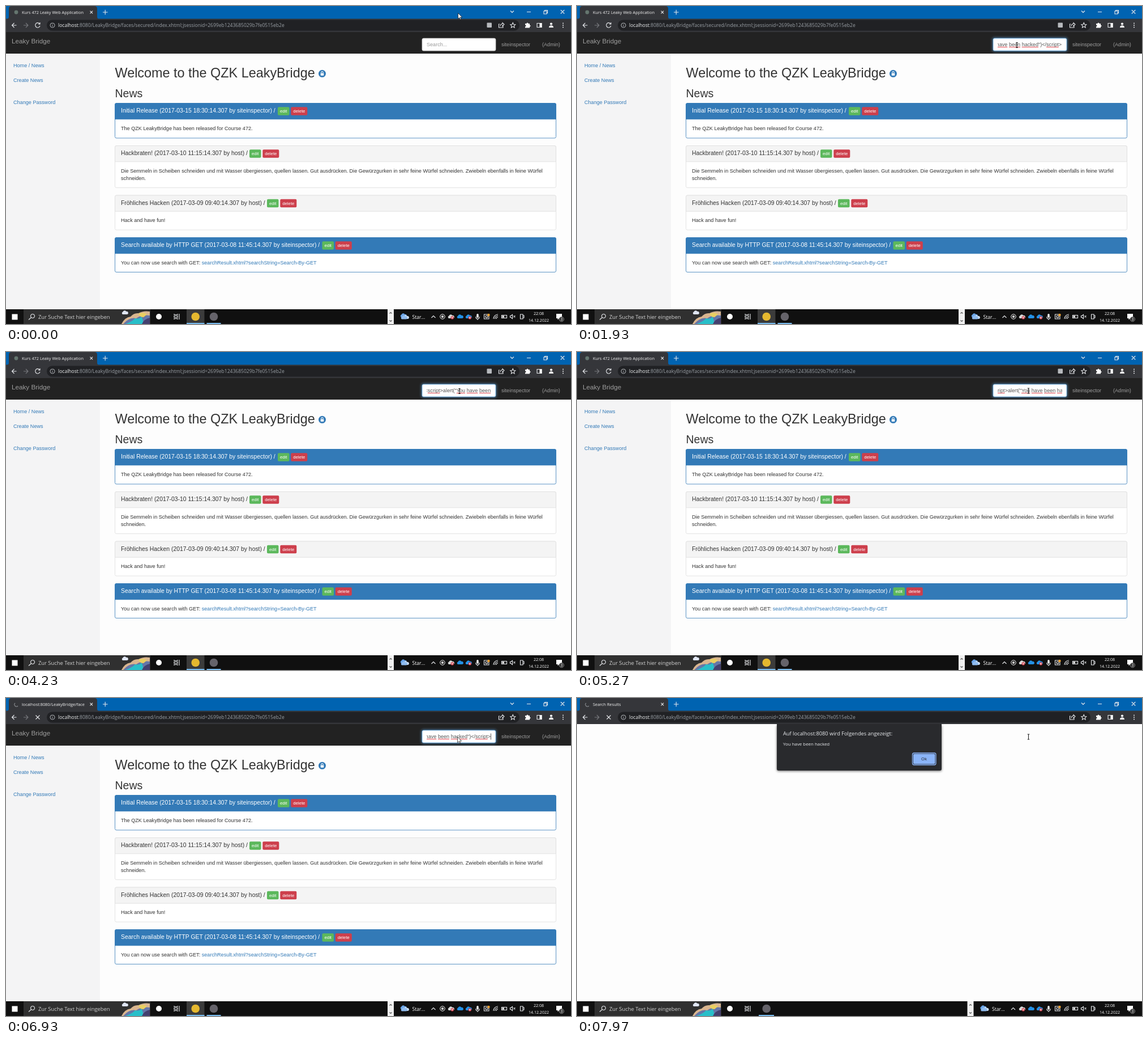
An HTML page for the animation above (8000 ms loop, 998x561 px).

```html
<!DOCTYPE html>
<html lang="de">
<head>
<meta charset="utf-8">
<title>Search demo</title>
<style>
  html, body { margin: 0; width: 100%; height: 100%; overflow: hidden; background: #fdfdfd; }
  svg { display: block; width: 100vw; height: 100vh; font: 9.1px "Liberation Sans", Arial, sans-serif; }
  text { white-space: pre; }
  .ui { font-family: "Open Sans", "Noto Sans", sans-serif; }
  .line { fill: none; stroke: #e8eaed; stroke-width: 1.1; }
  .link { fill: #337ab7; }
  #entry { font: 9.1px/22px "Liberation Sans", Arial, sans-serif; white-space: pre; color: #555; }
  #entry u { text-decoration: underline solid #e2474f .8px; text-underline-offset: 1.2px; text-decoration-skip-ink: none; }
</style>
</head>
<body>
<svg id="stage" viewBox="0 0 998 561" preserveAspectRatio="none"></svg>
<script>
const LOOP = 8000;
const FOCUS = 830, PASTE = 1450, SUBMIT = 6490, BLANK = 7150, ALERT = 7400;
const SCROLL_END = 76.6;

const rect = (x, y, w, h, fill, extra = '') =>
  `<rect x="${x}" y="${y}" width="${w}" height="${h}" fill="${fill}" ${extra}/>`;
const dot = (x, y, r, fill, extra = '') => `<circle cx="${x}" cy="${y}" r="${r}" fill="${fill}" ${extra}/>`;
const text = (x, y, s, fill, size = 9.1, extra = '') =>
  `<text x="${x}" y="${y}" fill="${fill}" font-size="${size}" ${extra}>${s}</text>`;
const ui = (x, y, s, fill, size, extra = '') => text(x, y, s, fill, size, 'class="ui" ' + extra);
const line = (d, extra = '') => `<path class="line" d="${d}" ${extra}/>`;
const shape = (d, fill, extra = '') => `<path d="${d}" fill="${fill}" ${extra}/>`;
const group = (id, ...parts) => `<g id="${id}">${parts.join('')}</g>`;

function button(x, y, w, label, fill) {
  return rect(x, y, w, 14.5, fill, 'rx="2"') +
    text(x + w / 2, y + 10, label, '#fff', 7.8, 'text-anchor="middle"');
}

function panel(y, h, blue, title, editX, ...body) {
  const edge = blue ? '#337ab7' : '#ddd';
  return rect(192.5, y + .5, 779, h - 1, '#fff', `rx="2.5" stroke="${edge}" stroke-width=".8"`) +
    shape(`M192.5 ${y + 28.7}v-25.7q0-2.5 2.5-2.5h774q2.5 0 2.5 2.5v25.7z`, blue ? '#337ab7' : '#f4f4f4', `stroke="${edge}" stroke-width=".8"`) +
    text(203, y + 17.2, title + ' /', blue ? '#fff' : '#333', 10.4) +
    button(editX, y + 7.2, 20.5, 'edit', '#5cb85c') +
    button(editX + 23.3, y + 7.2, 29, 'delete', '#cd3f4c') +
    body.map((s, i) => text(203, y + 47.8 + 13 * i, s, '#333')).join('');
}

function cloud(x, y, fill, crossed) {
  return shape(`M${x - 4} ${y + 3}a2.5 2.5 0 0 1 .5-4.5a3.2 3.2 0 0 1 6-.5a2.6 2.6 0 0 1 1.5 5z`, fill) +
    (crossed ? dot(x + 2.3, y + 2, 2.7, '#d32f3c') +
      line(`M${x + 1.2} ${y + .9}l2.2 2.2m0-2.2l-2.2 2.2`, 'stroke-width=".7"') : '');
}

function browserChrome() {
  return rect(0, 0, 998, 23, '#0063b1') +
    shape('M1 23q4 0 4-4V5q0-5 5-5h146q5 0 5 5v14q0 4 4 4z', '#35363a') +
    group('favicon', dot(18, 11, 3.4, '#65766f')) +
    group('spinner', line('M16 9a3.5 3.5 0 0 0 5 5', 'style="stroke:#8a8d91"')) +
    '<clipPath id="tabClip"><path d="M28 0h111v22h-111z"/></clipPath>' +
    ui(28, 13.8, '', '#f1f1f1', 7.35, 'id="tabTitle" clip-path="url(#tabClip)"') +
    line('M148.500 8.700l4.600 4.600m0-4.600l-4.600 4.600M171 11h8.500M175.200 6.800v8.500') +
    line('M891 8.500l3 3 3-3M920 10.500h7M950 9h5v5h-5zM951.500 9V7.500h5v5h-1.500M979.800 7l6.500 6.500m0-6.500l-6.500 6.500', 'stroke-width=".8"') +
    rect(0, 22.5, 998, 23.5, '#35363a') + rect(72, 24.5, 835, 19, '#202124', 'rx="9.500"') +
    line('M18.500 34h-8m4-4l-4 4 4 4') +
    line('M31 34h8m-4-4l4 4-4 4', 'style="stroke:#77797d"') +
    group('reload', line('M59.500 31.500a4.200 4.200 0 1 0 .5 3.500M60 29v3h-3')) +
    group('stop', line('M52.500 30.500l7 7m0-7l-7 7')) +
    line('M82 30a4 4 0 1 0 .1 0M82 33.500v2.700M82 31.500v.9', 'style="stroke:#a3a6aa" stroke-width=".9"') +
    ui(92, 37.2, '<tspan fill="#f1f3f4">localhost</tspan>:8080/LeakyBridge/faces/secured/index.xhtml;jsessionid=2699eb1243685029b7fe0515eb2e', '#9aa0a6', 8.56) +
    group('translate', rect(849.5, 29.5, 8.5, 8.5, '#b6b9bd', 'rx="1"')) +
    line('M872 32h-1.500v6h7.500v-2.500M873 35.500q.5-4 4-4v-2l3 3-3 3v-2', 'stroke-width=".8"') +
    line('M895.300 29.500l1.300 3 3.200.3-2.400 2.100.7 3.200-2.800-1.700-2.800 1.700.7-3.200-2.400-2.100 3.200-.3z', 'stroke-width=".9"') +
    shape('M917 31h2.500a1.500 1.500 0 1 1 3 0h2.500v2.500a1.500 1.500 0 1 1 0 3v2h-8v-2.200a1.500 1.500 0 0 0 0-3z', '#fff') +
    line('M938 30.500h8v7h-8z') + rect(942.5, 30, 4, 8, '#fff') +
    dot(963, 31.5, 2.1, '#fff') + shape('M959 38q0-3.800 4-3.800t4 3.800z', '#fff') +
    [30.5, 34, 37.5].map(y => dot(984, y, 1, '#e8eaed')).join('');
}

function page() {
  return rect(0, 84, 166, 451, '#f4f4f5') + rect(0, 46, 998, 38, '#222') +
    text(10, 66.3, 'Leaky Bridge', '#9d9d9d', 11.7) +
    text(875, 70.8, 'siteinspector', '#9d9d9d') + text(947, 70.8, '(Admin)', '#9d9d9d') +
    text(13, 108, 'Home / News', '#337ab7') + text(13, 134, 'Create News', '#337ab7') +
    text(13, 173, 'Change Password', '#337ab7') +
    text(192.5, 126, 'Welcome to the QZK LeakyBridge', '#333', 23.4) +
    dot(558.5, 119.3, 6.5, '#337ab7') + rect(555.7, 118.5, 5.6, 4.2, '#fff', 'rx=".6"') +
    line('M556.800 118.500v-1.300a1.700 1.700 0 0 1 3.400 0v1.300', 'style="stroke:#fff"') +
    text(192.5, 160.5, 'News', '#333', 19.5) +
    panel(171, 62.5, true, 'Initial Release (2017-03-15 18:30:14.307 by siteinspector)', 480,
      'The QZK LeakyBridge has been released for Course 472.') +
    panel(246, 75, false, 'Hackbraten! (2017-03-10 11:15:14.307 by host)', 430,
      'Die Semmeln in Scheiben schneiden und mit Wasser übergiessen, quellen lassen. Gut ausdrücken. Die Gewürzgurken in sehr feine Würfel schneiden. Zwiebeln ebenfalls in feine Würfel',
      'schneiden.') +
    panel(333.5, 62, false, 'Fröhliches Hacken (2017-03-09 09:40:14.307 by host)', 461, 'Hack and have fun!') +
    panel(408, 62, true, 'Search available by HTTP GET (2017-03-08 11:45:14.307 by siteinspector)', 558.5,
      'You can now use search with GET: <tspan class="link">searchResult.xhtml?searchString=Search-By-GET</tspan>') +
    group('glow', rect(733.5, 55.5, 133, 25, '#66afe9', 'rx="4" opacity=".5" filter="url(#blur)"')) +
    rect(735, 57, 130, 22, '#fff', 'id="field" rx="2.500" stroke-width=".8"') +
    text(743, 70.8, 'Search...', '#999', 9.1, 'id="placeholder"') +
    '<foreignObject x="743" y="57" width="114" height="22"><div id="entry">' +
    '&lt;<u>script</u>&gt;alert("<u>You</u> <u>have</u> <u>been</u> <u>hacked</u>")&lt;/<u>script</u>&gt;</div></foreignObject>' +
    rect(743, 62.5, .8, 11, '#333', 'id="caret"');
}

function suggestions() {
  const items = ['hallo', "&lt;script alert=('asdf'); &gt;", "alert('You have been hacked')",
    'Change', 'Search', "alert('you have been hacked!')"];
  return rect(786, 84, 133, 146, '#000', 'rx="2" opacity=".4" filter="url(#blur)"') +
    rect(786, 84, 133, 146, '#222326', 'rx="2"') +
    items.map((s, i) => ui(794, 101.8 + 23.35 * i, s, '#eceef0', 7.95)).join('');
}

function dialog() {
  return rect(353, 48, 291, 81, '#000', 'rx="3" opacity=".6" filter="url(#blur)"') +
    shape('M353 46h291v79q0 3-3 3h-285q-3 0-3-3z', '#292a2d') +
    ui(364, 65.5, 'Auf localhost:8080 wird Folgendes angezeigt:', '#e8eaed', 9.28) +
    ui(364, 83.7, 'You have been hacked', '#e8eaed', 7.9) +
    rect(592.5, 97, 41.5, 21, '#292a2d', 'rx="3" stroke="#8ab4f8" stroke-width="1.300"') +
    rect(594, 98.5, 38.5, 18, '#8ab4f8', 'rx="2"') +
    ui(613, 110.3, 'Ok', '#202124', 7.6, 'text-anchor="middle"');
}

function taskbar() {
  return rect(0, 535, 998, 26, '#101010') + rect(10.5, 543.5, 10, 10, '#fff') +
    rect(31, 535, 224, 26, '#303030') +
    line('M47 543.500a3.500 3.500 0 1 0 .1 0M44.500 549.500l-4.500 4') +
    ui(57, 551.7, 'Zur Suche Text hier eingeben', '#d2d2d2', 9.4) +
    shape('M204 561q6-12 16-13 6-7 14-6 9-5 20-3v22z', '#d9b58f') +
    shape('M207 561q11-13 23-10 10-7 24-5v15z', '#6576a8') +
    shape('M211 561q13-5 17-10 8 2 11-3 4 6 3 13z', '#28bfc9') +
    shape('M234 543q9-4 15 1l-6 5q-7 0-9-6z', '#e9cf62') +
    shape('M240 561q4-9 14-11v11z', '#44406f') +
    cloud(210, 541, '#dfe5f2', false) +
    dot(270, 548, 5, '#fff') +
    line('M297 543v1.500h6V543M297 553v-1.500h6v1.500M297 546.500h6v3h-6zM306 543v10', 'stroke-width=".9"') +
    group('apps', rect(319, 535, 31.5, 26, '#3b3b3b'), rect(319, 559, 31.5, 2, '#76b9ed'),
      dot(334.7, 548, 7.3, '#e5b82f'), rect(354.5, 559, 25, 2, '#76b9ed'), dot(367, 548, 7.3, '#65636a')) +
    group('appsLate', rect(321, 559, 27, 2, '#76b9ed'), dot(334.7, 548, 7.3, '#65636a')) +
    group('record', dot(771, 548, 4.2, 'none', 'stroke="#fff"'), dot(771, 548, 2, '#fff')) +
    group('tray',
      rect(674, 535, 11, 26, '#f0f0f0'),
      line('M677.500 542.500l2-2 2 2M677.500 554.500l2 2 2-2', 'style="stroke:#555"'),
      cloud(702, 546, '#6aa5e8', false), cloud(706, 549, '#cfe0f6', false), cloud(703, 549.5, '#8fbcf0', false),
      ui(717.5, 551.8, 'Star...', '#fff', 8.6),
      line('M751.500 550l3.500-3.500 3.500 3.500')) +
    cloud(786, 548, '#d8d8d8', true) + cloud(802, 548, '#2491e6', false) + cloud(817, 548, '#2491e6', true) +
    rect(831.3, 543, 3.4, 7, '#fff', 'rx="1.700"') + line('M829.800 548q0 4 3.200 4t3.200-4M833 552v2', 'stroke-width=".8"') +
    line('M844.500 544h8.500v8h-8.500zM847 548a2 2 0 1 0 4 0a2 2 0 1 0-4 0', 'stroke-width=".9"') + dot(852.5, 545, 2.2, '#f0a030') +
    line('M861 552a8 8 0 0 1 8-8M863.500 552a5.500 5.500 0 0 1 5.500-5.500M866 552a3 3 0 0 1 3-3', 'stroke-width=".8"') +
    line('M875.500 545.500h9v5h-9z', 'stroke-width=".9"') + rect(876.5, 546.5, 3.5, 3, '#fff') +
    line('M890.500 546.500h1.500l2.500-2v7l-2.500-2h-1.500zM896.500 546.500l3 3m0-3l-3 3', 'stroke-width=".8"') +
    line('M908.500 544h4.500v8h-4.500zM913 546h2v4h-2', 'stroke-width=".9"') +
    ui(941, 544.6, '22:08', '#fff', 7.05, 'text-anchor="middle"') +
    ui(941, 556.5, '14.12.2022', '#fff', 7.05, 'text-anchor="middle"') +
    shape('M972 543h10v8h-5l-2.500 2.500V551h-2.500z', '#fff') +
    dot(981.3, 552.5, 4.2, '#333', 'stroke="#b8b8b8" stroke-width=".6"') +
    ui(981.3, 555, '3', '#fff', 6.5, 'text-anchor="middle"');
}

const stage = document.getElementById('stage');
stage.innerHTML =
  '<filter id="blur" x="-20%" y="-50%" width="140%" height="200%"><feGaussianBlur stdDeviation="2"/></filter>' +
  rect(0, 0, 998, 561, '#fdfdfd') +
  group('page', page()) + browserChrome() + group('suggestions', suggestions()) +
  group('dialog', dialog()) + taskbar() +
  group('arrow', shape('M0 0v10.200l2.400-2.200 1.600 3.600 1.500-.7-1.600-3.500h3.300z', '#fff', 'stroke="#111" stroke-width=".7"')) +
  group('beam', line('M-1.800-4.500h3.600M0-4.500v9M-1.800 4.500h3.600', 'style="stroke:#222" stroke-width=".9"'));

const el = Object.fromEntries([...stage.querySelectorAll('[id]')].map(node => [node.id, node]));
const show = (name, on) => { el[name].style.display = on ? '' : 'none'; };

// Eased interpolation through [time, value] keys.
function track(t, keys) {
  const next = keys.findIndex(key => key[0] > t);
  if (next < 0) return keys[keys.length - 1][1];
  if (next === 0) return keys[0][1];
  const [t0, a] = keys[next - 1], [t1, b] = keys[next];
  const k = (t - t0) / (t1 - t0);
  return a + (b - a) * k * k * (3 - 2 * k);
}

function render(t) {
  const filled = t >= PASTE, loading = t >= SUBMIT, blank = t >= BLANK, late = t >= ALERT;
  const focused = t >= FOCUS;

  show('page', !blank);
  show('suggestions', focused && !filled);
  show('dialog', late);
  show('glow', focused);
  el.field.setAttribute('stroke', focused ? '#66afe9' : '#ccc');
  show('placeholder', !filled);
  show('entry', filled);
  const scroll = track(t, [[2300, SCROLL_END], [2700, 3.5], [4300, 3.5], [5150, 14.4], [5500, 14.4], [6050, SCROLL_END]]);
  el.entry.style.marginLeft = -scroll + 'px';
  show('caret', (focused && t < FOCUS + 530) || loading);
  el.caret.setAttribute('x', filled ? 856.2 : 743);

  show('favicon', !loading);
  show('spinner', loading);
  show('reload', !loading);
  show('stop', loading);
  show('translate', !loading);
  el.tabTitle.textContent = blank ? 'Search Results'
    : loading ? 'localhost:8080/LeakyBridge/faces/secured' : 'Kurs 472 Leaky Web Application';

  show('apps', !late);
  show('appsLate', late);
  show('record', !late);
  el.tray.setAttribute('transform', `translate(${late ? 15.5 : 0} 0)`);

  const dip = t > 3570 && t < 3830 ? Math.sin(Math.PI * (t - 3570) / 260) : 0;
  const x = track(t, [[80, 798.5], [720, 777], [2350, 777], [2700, 801], [4300, 801], [5150, 797.5]]) + 12 * dip;
  const y = track(t, [[80, 12.5], [720, 69], [4300, 69], [5150, 68.5]]) + 32 * dip;
  const overField = y > 57 && y < 79 && (!loading || late);
  show('arrow', !overField);
  show('beam', overField);
  el[overField ? 'beam' : 'arrow'].setAttribute('transform', `translate(${x} ${y})`);
}

const start = performance.now();
function tick() {
  render((performance.now() - start) % LOOP);
  requestAnimationFrame(tick);
}
tick();
</script>
</body>
</html>
```
